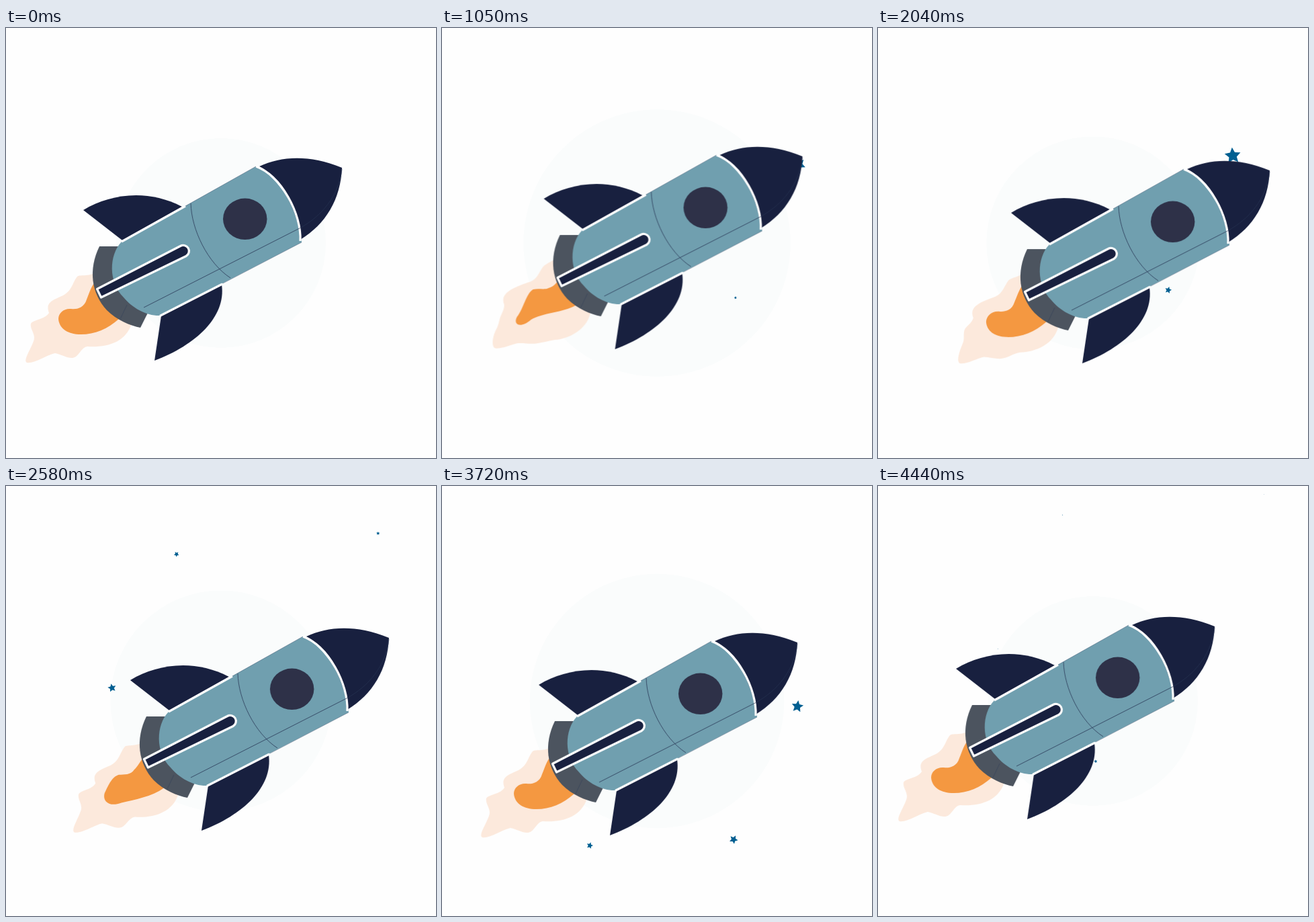
Recreate the animation shown at these times as an HTML page. Size 640x640 px, loop 4470 ms.

```html
<!DOCTYPE html>
<html lang="en">
<head>
<meta charset="utf-8">
<title>Rocket</title>
<style>
  html, body { margin: 0; width: 100%; height: 100%; overflow: hidden; background: #fefefe; }
  svg { display: block; width: 100vw; height: 100vh; }
  .navy { fill: #18203f; }
  .trim { stroke: #fff; stroke-width: 3.2; }
  .seam { stroke: #2b3a58; stroke-width: .8; }
  .line { fill: none; }

  #halo { fill: #fafcfc; animation: pulse 1117.5ms ease-in-out infinite alternate; }
  #rocket { animation: drift 4470ms linear infinite; }
  #outer { fill: #fce9dc; animation: billow 4470ms linear infinite; }
  #inner { fill: #f49841; animation: flicker 4470ms linear infinite; }

  @keyframes pulse { from { r: 156px; } to { r: 199px; } }

  @keyframes drift {
    0%, 100% { transform: translate(0, 0); }
    14.8% { transform: translate(23px, -15px); }
    32.9% { transform: translate(51px, -19px); }
    45.6% { transform: translate(83px, 4px); }
    49% { transform: translate(86px, 11px); }
    69.1% { transform: translate(49px, 27px); }
    83.2% { transform: translate(29px, 25px); }
  }

  /* Jagged and billowing flame */
  @keyframes billow {
    0%, 57%, 83%, 100% {
      d: path("M140 360C125 372 110 366 106 370C98 380 99 390 85 398C70 405 58 408 64 424C58 434 40 434 37 440C35 448 45 456 41 466C36 480 25 495 31 498C42 500 62 486 73 484C84 486 96 495 104 489C110 485 113 475 121 474C150 476 178 468 187 440L175 410Z");
    }
    33%, 69% {
      d: path("M136 355C128 362 123 367 117 373C111 382 108 390 99 393C70 402 45 412 53 431C55 438 57 445 55 452C53 459 48 463 44 468C38 480 42 494 50 492C60 491 68 489 76 487C86 485 96 485 106 485C116 485 126 486 136 484C155 480 178 465 183 443L176 418Z");
    }
  }

  /* Round and pointed core */
  @keyframes flicker {
    0%, 46%, 83%, 100% {
      d: path("M134 376C126 385 124 395 120 404C116 418 103 419 97 418C86 417 78 424 78 433C79 446 90 455 108 456C130 457 150 449 168 433L150 380Z");
    }
    15%, 33%, 69% {
      d: path("M141 388C134 396 130 402 122 404C116 407 108 404 99 406C88 413 85 435 75 447C69 458 80 465 96 451C112 441 145 440 162 430L150 380Z");
    }
  }
</style>
</head>
<body>
<svg viewBox="0 0 640 640">
  <circle id="halo" cx="320" cy="320" r="156"/>
  <path id="stars" fill="#005f91"/>
  <g id="rocket">
    <path id="outer"/>
    <path id="inner"/>
    <path fill="#4c545f" d="M139 325H172L211 424 200 446C185 443 165 435 150 420 127 395 122 360 139 325Z"/>
    <path class="seam line" d="M180 412L170 433" opacity=".5"/>
    <path class="navy" d="M115 271C155 247 210 239 262 266L173 316Z"/>
    <path class="navy" d="M321 382C328 430 282 472 221 495L231 428Z"/>
    <path fill="#709faf" d="M372 206L172 318C153 338 152 378 175 401 188 417 210 429 230 428L440 319C440 278 407 222 372 206Z"/>
    <path class="navy" d="M377 206C410 191 450 188 500 208 498 255 476 292 438 315 437 280 410 222 377 206Z"/>
    <path class="trim line" d="M372 206C410 220 440 277 438 317"/>
    <path class="trim line" d="M172 318L267 265M229 428.500L322 381"/>
    <path class="seam line" d="M267 265L372 206M323 380L440 319" opacity=".45"/>
    <path class="seam line" d="M275 261C276 300 300 350 334 372M205 416L437 298"/>
    <path class="seam line" d="M437 298C470 280 495 250 500 210" opacity=".7"/>
    <ellipse cx="355.700" cy="284.300" rx="32.700" ry="30.700" fill="#2e3148"/>
    <path class="trim navy" stroke-linejoin="round" d="M135.500 388.500L259.500 324.500A8.400 8.400 0 0 1 268 339.500L141.500 401Z"/>
  </g>
</svg>
<script>
const LOOP = 4470, CYCLE = 2118;

// Place in the field, then birth, life and size
const stars = [
  { x: 0, y: 0, birth: 100, life: 1930, size: 11 },
  { x: -95, y: 198, birth: 860, life: 950, size: 8 },
  { x: -300, y: 31, birth: 100, life: 980, size: 6.2 },
  { x: -396, y: 230, birth: 150, life: 1000, size: 12.3 },
  { x: -309, y: 207, birth: 1080, life: 950, size: 5.2 },
  { x: -1, y: -237, birth: 1638, life: 660, size: 12.5 },
  { x: -97, y: -37, birth: 1638, life: 660, size: 5.2 },
  { x: -205, y: -81, birth: 2213, life: 400, size: 6 }
];

function starPath(x, y, r, tilt) {
  const points = Array.from({ length: 10 }, (_, i) => {
    const a = (i * 36 - 90 + tilt) * Math.PI / 180, s = i % 2 ? r * .48 : r;
    return (x + s * Math.cos(a)).toFixed(2) + " " + (y + s * Math.sin(a)).toFixed(2);
  });
  return "M" + points.join("L") + "Z";
}

// The field falls steadily and curves in from the right; each star swells and fades
function field(age) {
  const fieldX = 529 + 14 * Math.max(0, (1602 - age) / 942) ** 3;
  const fieldY = 115 + .226 * (age - 660);
  return stars.map(({ x, y, birth, life, size }, i) => {
    const k = (age - birth) / life;
    if (k <= 0 || k >= 1) return "";
    const r = size * Math.sin(Math.PI * k ** 1.5);
    return starPath(fieldX + x, fieldY + y, r, .07 * age - 32 + 20 * i);
  }).join("");
}

const sky = document.getElementById("stars");
const start = performance.now();
function tick() {
  let d = "";
  for (let age = (performance.now() - start) % LOOP; age > 0; age -= CYCLE) d += field(age);
  sky.setAttribute("d", d);
  requestAnimationFrame(tick);
}
tick();
</script>
</body>
</html>
```
